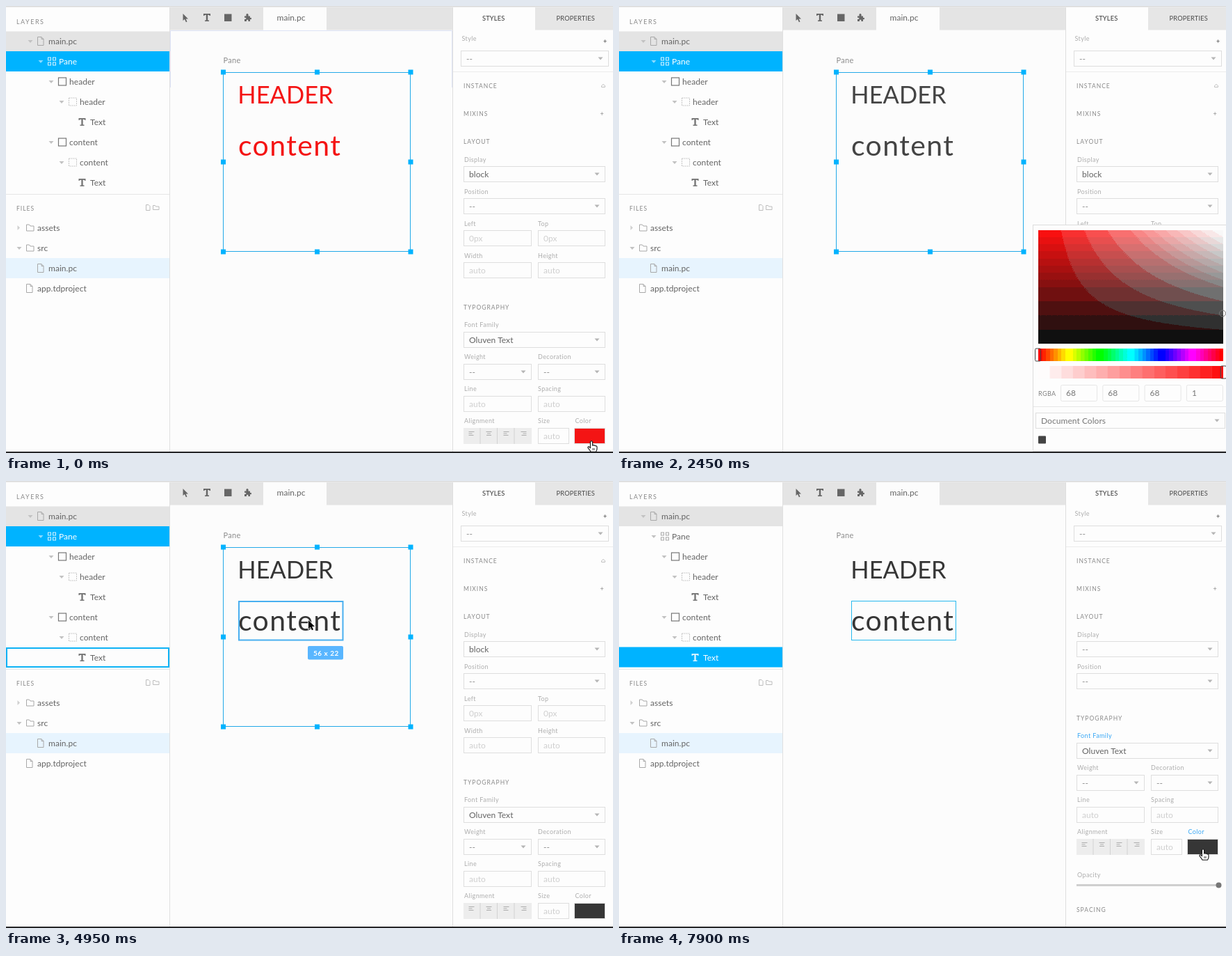
Recreate the animation shown at these times as an HTML page. Size 873 by 642 pixels, loop 7.99 s.

```html
<!DOCTYPE html>
<html lang="en">
<head>
<meta charset="utf-8">
<title>Design editor</title>
<style>
html, body { margin: 0; width: 100%; height: 100%; overflow: hidden; background: #fcfcfc; }
svg { display: block; width: 873px; height: 642px; }
text { font-family: Lato, "Open Sans", sans-serif; fill: #646464; white-space: pre; }
.body { font-size: 12px; letter-spacing: .05px; }
.label { font-size: 9px; letter-spacing: .4px; fill: #adadad; }
.name { font-size: 11px; letter-spacing: .3px; fill: #8c8c8c; }
.head { font-size: 8.5px; letter-spacing: 1px; fill: #8a8a8a; }
.wide { font-size: 9px; letter-spacing: 1.5px; fill: #8a8a8a; }
.tab { font-size: 9.3px; letter-spacing: .15px; fill: #4a4a4a; }
.tag { font-size: 10px; letter-spacing: .5px; font-weight: 700; fill: #fff; }
.title { font-size: 34.5px; }
.copy { font-size: 41px; letter-spacing: 1.4px; }
</style>
</head>
<body>
<svg viewBox="0 0 873 642">
  <defs>
    <linearGradient id="tint"><stop stop-color="#f00"/><stop offset="1" stop-color="#fff"/></linearGradient>
    <linearGradient id="shade" x2="0" y2="1"><stop stop-opacity="0"/><stop offset="1"/></linearGradient>
    <linearGradient id="hue"></linearGradient>
    <filter id="fieldBands" x="0" y="0" width="1" height="1" color-interpolation-filters="sRGB"></filter>
    <filter id="hueBands" x="0" y="0" width="1" height="1" color-interpolation-filters="sRGB"></filter>
  </defs>
  <g id="stage"></g>
</svg>
<script>
const LOOP = 7990;
const BLUE = '#00b3ff';
const OPEN = 860, PICK = 1670, RELEASE = 2920, CLOSE = 3970, HOVER = 4950, SELECT = 5570, LEAVE = 6110;
const FIELD = { x: 603, y: 322, w: 266, h: 163 };
const byId = id => document.getElementById(id);

// Pointer moves: first step, last step, step count, end point
const START = [842, 625];
const MOVES = [
  [170, 170, 1, 841, 624],
  [950, 950, 1, 840, 621],
  [1190, 1400, 3, 763, 415],
  [1670, 2150, 6, 866, 438],
  [2330, 2450, 2, 880, 441.5],
  [2570, 2920, 4, 880, 450.5],
  [3130, 3340, 3, 839, 204],
  [3520, 3700, 3, 820, 180],
  [4420, 4740, 4, 480, 262],
  [4850, 4950, 2, 435, 200],
  [6110, 6110, 1, 538, 239],
  [6260, 7010, 9, 795, 474],
  [7100, 7100, 1, 815, 507],
  [7280, 7540, 4, 841, 530],
  [7900, 7900, 1, 840, 529]
];

function pointer(t) {
  let [x, y] = START;
  for (const [from, to, count, endX, endY] of MOVES) {
    if (t < from) break;
    const gap = (to - from) / Math.max(1, count - 1);
    const step = gap ? Math.min(count, Math.floor((t - from) / gap + .02) + 1) : 1;
    const k = 1 - (1 - step / count) ** 1.94;
    x += (endX - x) * k;
    y += (endY - y) * k;
  }
  return [x, y];
}

function pick(t) {
  if (t < PICK) return { ring: [FIELD.x, FIELD.y], rgb: [244, 20, 20] };
  const [px, y] = pointer(Math.min(t, RELEASE));
  const x = Math.min(px, 868);
  const value = 255 * (1 - (y - FIELD.y) / FIELD.h);
  const rest = Math.round(value * (x - FIELD.x) / 265);
  return { ring: [x, y], rgb: [Math.round(value), rest, rest] };
}

// Drawing helpers
const rect = (x, y, w, h, fill, more = '') => `<rect x="${x}" y="${y}" width="${w}" height="${h}" fill="${fill}" ${more}/>`;
const frame = (x, y, w, h, color, width = 1, more = '') => rect(x, y, w, h, 'none', `stroke="${color}" stroke-width="${width}" ${more}`);
const line = (d, color, width = 1) => `<path d="${d}" fill="none" stroke="${color}" stroke-width="${width}"/>`;
const shape = (x, y, d, fill, more = '') => `<path transform="translate(${x} ${y})" d="${d}" fill="${fill}" ${more}/>`;
const text = (x, y, s, cls = 'body', fill = '') => `<text x="${x}" y="${y}" class="${cls}"${fill && ` style="fill:${fill}"`}>${s}</text>`;
const caret = (x, y, color = '#c2c2c2') => shape(x, y, 'M-3.5-2H3.5L0 2Z', color);
const label = (x, y, s, fill) => text(x, y + 3, s, 'label', fill);
const head = (x, y, s) => text(x, y + 3, s, 'head');

const LETTER = 'M0 0H10V3H9Q8.5 1.7 6.2 1.7V9.4H8V11H2V9.4H3.8V1.7Q1.5 1.7 1 3H0Z';
const ARROW = 'M0 0V12.5L2.9 9.8 4.9 14.3 7 13.4 5.1 9H9Z';
const HAND = 'M-1.6 1Q0-1.6 1.6 1V6Q3 4.8 4 6.4 5.5 5.4 6.2 7 8 6.4 8 8.5V11Q8 13 6.5 15.3H-1Q-2 13-5 9.6-5.5 7.4-3.4 8L-1.6 9.6Z';

const icons = {
  page: (x, y, c) => line(`M${x + .5} ${y - 6}h5.5l3 3v9h-8.5zM${x + 6} ${y - 6}v3h3`, c),
  folder: (x, y, c) => line(`M${x + .5} ${y + 4.5}v-9h4l1.5 2h5v7z`, c),
  pane: (x, y, c) => [0, 7].map(dx => [-5.5, 1.5].map(dy => frame(x + dx + .5, y + dy, 4, 4, c)).join('')).join(''),
  box: (x, y, c) => frame(x + .5, y - 5.5, 11, 11, c, 1.2),
  slot: (x, y) => frame(x + .5, y - 5.5, 11, 11, '#c4c4c4', 1, 'stroke-dasharray="2 1"'),
  text: (x, y, c) => shape(x - .5, y - 5.5, LETTER, c)
};

function item(x, y, icon, name, hasCaret = true, active = false) {
  const ink = active ? '#fff' : '';
  const iconInk = active ? '#d9f3ff' : icon === 'box' || icon === 'text' ? '#777' : '#a8a8a8';
  return (hasCaret ? caret(x, y + .5, active ? '#8adbff' : undefined) : '') +
    icons[icon](x + 10, y, iconInk) + text(x + 26, y + 4, name, 'body', ink);
}

function control(x, y, w, value, { list = true, ink = '' } = {}) {
  const fill = ink || (value === '--' ? '#8a8a8a' : list ? '' : '#cfcfcf');
  return rect(x + .5, y + .5, w, 22, '#fdfdfd', 'stroke="#dedede"') +
    text(x + 8, y + 15.5, value, 'body', fill) + (list ? caret(x + w - 11, y + 11.5, '#b5b5b5') : '');
}

const LAYERS = [
  [0, 'page', 'main.pc'], [1, 'pane', 'Pane'], [2, 'box', 'header'], [3, 'slot', 'header'],
  [4, 'text', 'Text'], [2, 'box', 'content'], [3, 'slot', 'content'], [4, 'text', 'Text']
];

function sidebar(t) {
  const active = t < SELECT ? 1 : 7;
  let out = rect(0, 2, 235, 638, '#fdfdfd') + line('M235.5 2V640', '#e0e0e0') + text(15, 25.5, 'LAYERS', 'wide');
  out += rect(0, 36.5, 235, 28.5, '#e4e4e4') + rect(0, active === 1 ? 65 : 238.5, 235, 29, BLUE);
  LAYERS.forEach(([depth, icon, name], i) => {
    out += item(35 + 15 * depth, 50.5 + 29 * i, icon, name, depth < 4, i === active);
  });
  if (t >= HOVER && t < SELECT) out += frame(1, 240, 233, 27, '#0db2f5', 2);
  out += line('M0 270.5H235', '#e6e6e6') + head(15, 290.5, 'FILES');
  out += line('M201.5 285.5h3.5l2 2v6h-5.5zM211.5 292.5v-6h3l1 1.5h4.5v4.5z', '#bdbdbd');
  out += rect(0, 362, 235, 29, '#e7f4fe');
  out += shape(18, 318.5, 'M-1.5-3.5V3.5L2 0Z', '#d0d0d0') + item(19, 318.5, 'folder', 'assets', false);
  return out + item(19, 347.5, 'folder', 'src') + item(35, 376.5, 'page', 'main.pc', false) +
    item(19, 405.5, 'page', 'app.tdproject', false);
}

function toolbar() {
  return rect(236, 2, 406, 32.5, '#e4e4e4') + rect(370, 2, 91, 33, '#fcfcfc') + text(389.5, 20.5, 'main.pc') +
    shape(254.5, 11, 'M0 0V10L2.4 8 4.4 12.2 6 11.4 4.2 7.4H7.5Z', '#666') + shape(284, 11, LETTER, '#666') +
    rect(314, 11.5, 10.5, 10.5, '#666') +
    shape(343, 11, 'M0 3.5H2.6Q1.8 0 4 0T5.4 3.5H8V6Q10 5 10 7T8 8V11H5.4Q6 8.5 4.2 8.5T3 11H0V8Q2.5 8 2.5 6.7T0 5.7Z', '#666');
}

function artboard(t, color) {
  let out = text(312.5, 82, 'Pane', 'name');
  if (t < 950) out += line('M236.5 117V35.5H641.5V117', '#dde3f6');
  out += text(333.3, 140, 'HEADER', 'title', color) + text(334, 214.5, 'content', 'copy', color);
  if (t < SELECT) {
    out += frame(312.5, 95.5, 269, 257, '#22a9e8');
    for (const x of [312.5, 447.5, 582]) for (const y of [95, 224, 353])
      if (x !== 447.5 || y !== 224) out += rect(x - 3.5, y - 3.5, 7, 7, BLUE);
    if (t >= HOVER) out += frame(335, 173, 149.5, 55.5, '#49aff0', 2);
  } else out += frame(334.5, 172.5, 150, 56, '#27b9ef');
  if (t >= HOVER && t < LEAVE) out += rect(434, 237, 51, 19.5, '#59b6ff', 'rx="2"') + text(442, 250.5, '56 x 22', 'tag');
  return out;
}

function typography(y, color, ink) {
  let out = head(658, y, 'TYPOGRAPHY') + label(659, y + 25, 'Font Family', ink) + control(658, y + 35, 203, 'Oluven Text');
  out += label(659, y + 71, 'Weight') + control(658, y + 81, 97, '--') + label(765, y + 71, 'Decoration') + control(765, y + 81, 96, '--');
  out += label(659, y + 117, 'Line') + control(658, y + 127, 97, 'auto', { list: false }) +
    label(765, y + 117, 'Spacing') + control(765, y + 127, 96, 'auto', { list: false });
  out += label(659, y + 163, 'Alignment') + rect(658, y + 173, 98, 23, '#ededed');
  for (let i = 0; i < 4; i++) {
    const x = 669.5 + 25 * i;
    if (i) out += line(`M${657.5 + 24.5 * i} ${y + 173}v23`, '#d2d2d2');
    [8, 5, 7].forEach((w, j) => {
      const left = x - 4 + (i === 3 ? 8 - w : i === 1 ? (8 - w) / 2 : 0);
      out += line(`M${left} ${y + 178.5 + 2.5 * j}h${w}`, '#a6a6a6', .9);
    });
  }
  return out + label(765, y + 163, 'Size') + control(765, y + 173, 44, 'auto', { list: false }) +
    label(818.5, y + 163, 'Color', ink) + rect(817.5, y + 173.5, 44, 22, color, 'stroke="#dedede"');
}

function inspector(t, color) {
  const whole = t < SELECT;
  let out = rect(643, 2, 230, 638, '#fdfdfd') + line('M642.5 2V640', '#dedede') + rect(761, 2, 112, 32.5, '#e6e6e6');
  out += text(685, 21, 'STYLES', 'tab', '#333') + text(791.5, 21, 'PROPERTIES', 'tab');
  out += label(655.5, 47, 'Style') + text(859, 54, '+', 'label', '#444') + control(654, 64, 212, '--') + line('M643 94.5H873', '#ececec');
  out += head(658, 114.5, 'INSTANCE') + head(658, 155, 'MIXINS') + text(854.5, 158, '+', 'label', '#888') + head(658, 195, 'LAYOUT');
  if (whole) out += line('M856.5 116.5v-2l2.5-2 2.5 2v2z', '#c0c0c0');
  out += label(659, 220.5, 'Display') + control(658, 230, 203, whole ? 'block' : '--') + label(659, 266.5, 'Position') + control(658, 276, 203, '--');
  if (whole) {
    [['Left', 'Top', '0px'], ['Width', 'Height', 'auto']].forEach(([a, b, value], i) => {
      const y = 312.5 + 46 * i;
      out += label(659, y, a) + label(765, y, b) + control(658, y + 9.5, 97, value, { list: false }) + control(765, y + 9.5, 96, value, { list: false });
    });
    return out + typography(433, color);
  }
  return out + typography(341, color, '#38a7f5') + label(659, 566, 'Opacity') + rect(658, 579, 204, 3, '#cfcfcf') +
    `<circle cx="862.5" cy="580.5" r="4" fill="#777"/>` + head(658, 616, 'SPACING');
}

function picker(t, { ring, rgb }, color) {
  const { x, y, w, h } = FIELD;
  const slider = (cx, top) => frame(cx - 4, top, 8, 18, '#444', 1, 'rx="1.5"');
  let out = rect(595.5, 314.5, 290, 325, '#fdfdfd', 'stroke="#dcdcdc"');
  out += `<g filter="url(#fieldBands)">${rect(x, y, w, h, 'url(#tint)')}${rect(x, y, w, h, 'url(#shade)')}</g>`;
  out += rect(x, 492, w, 18, 'url(#hue)', 'filter="url(#hueBands)"');
  for (let i = 0; i < 16; i++) {
    const c = Math.round(252 - 235 * i / 15);
    out += rect(x + i * w / 16, 517, w / 16 + (i < 15 ? .4 : 0), 18, `rgb(254,${c},${c})`);
  }
  out += slider(t < PICK ? 655.5 : 602.5, 492) + slider(t < PICK ? 736 : 869.5, 517);
  out += `<circle cx="${ring[0]}" cy="${ring[1]}" r="4.5" fill="none" stroke="#777"/>`;
  out += text(603, 559.5, 'RGBA', 'label', '#808080');
  [...rgb, 1].forEach((value, i) => {
    const left = 635 + 60.3 * i;
    out += frame(left + .5, 544.5, 52, 23, '#e6e6e6', 1, 'rx="2"') + text(left + 8, 560, value, 'body', '#777');
  });
  out += line('M596 575.5H873', '#e6e6e6') + control(599, 584, 272, 'Document Colors', { ink: '#777' });
  const dragging = t >= PICK && t < RELEASE;
  return out + rect(603, 617.5, 11, 11, color, dragging ? 'rx="1"' : 'stroke="#62b5ee" stroke-width="2"');
}

function cursor(t) {
  const [x, y] = pointer(t);
  return t < 950 || t >= 7280
    ? shape(x, y, HAND, '#fff', 'stroke="#111" stroke-width="1.1"') + shape(x, y, 'M2 10v3M4 10v3', 'none', 'stroke="#111" stroke-width=".8"')
    : shape(x, y, ARROW, '#000', 'stroke="#fff" stroke-width="1.4" paint-order="stroke"');
}

function scene(t) {
  const choice = pick(t);
  const color = `rgb(${choice.rgb})`;
  return rect(0, 0, 873, 642, '#fcfcfc') + artboard(t, color) + sidebar(t) + toolbar() + inspector(t, color) +
    (t >= OPEN && t < CLOSE ? picker(t, choice, color) : '') +
    rect(0, 0, 873, 1.5, '#dadada') + rect(0, 640, 873, 2, '#262628') + cursor(t);
}

// Colour bands: coarse in the darks, finer in the lights
function addBands(id, levels) {
  byId(id).innerHTML = `<feComponentTransfer>${['R', 'G', 'B'].map(c =>
    `<feFunc${c} type="discrete" tableValues="${levels.join(' ')}"/>`).join('')}</feComponentTransfer>`;
}
addBands('fieldBands', Array.from({ length: 16 }, (_, i) => (i < 8 ? (i >> 1) * 32 + 16 : i * 16 + 8) / 255));
addBands('hueBands', Array.from({ length: 8 }, (_, i) => i / 7));
byId('hue').innerHTML = Array.from({ length: 7 }, (_, i) =>
  `<stop offset="${i / 6}" stop-color="hsl(${i * 60},100%,50%)"/>`).join('');

const stage = byId('stage');
const began = performance.now();
let shown = '';
function tick() {
  const next = scene((performance.now() - began) % LOOP);
  if (next !== shown) stage.innerHTML = shown = next;
  requestAnimationFrame(tick);
}
tick();
</script>
</body>
</html>
```
